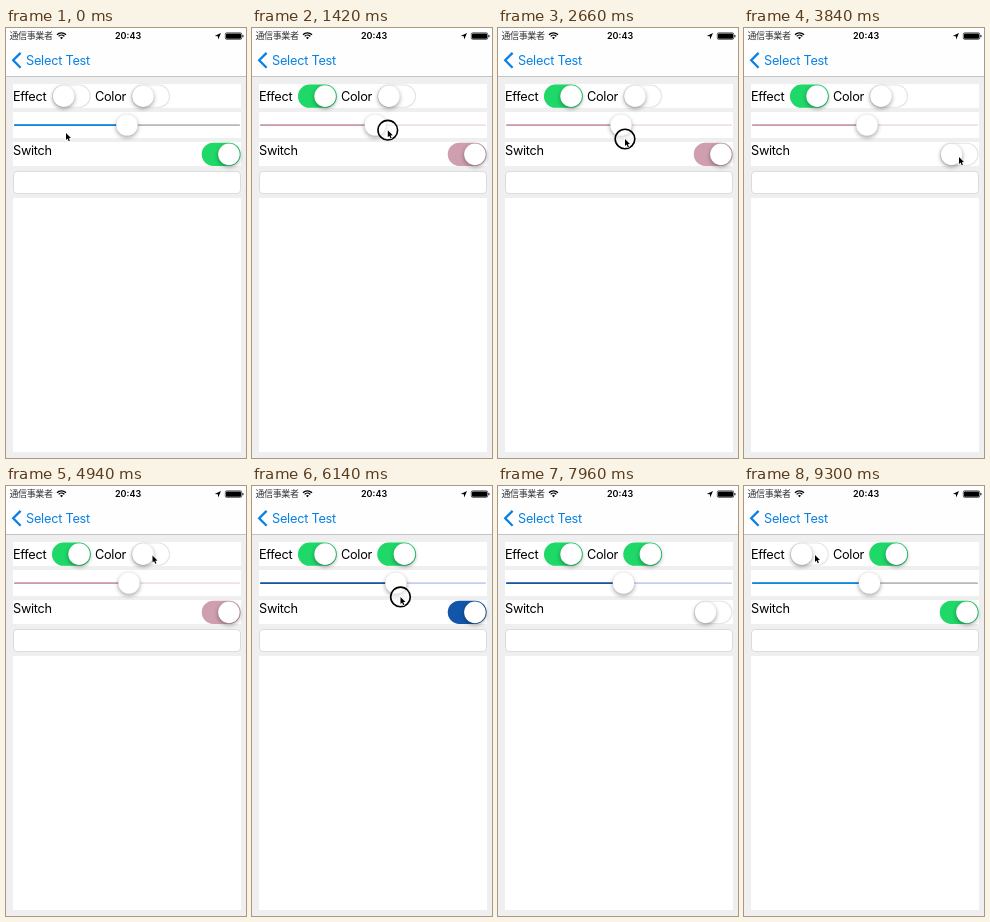
Recreate the animation shown at these times as an HTML page with a canvas. Size 240 by 430 pixels, loop 9320 ms.

```html
<!DOCTYPE html>
<html lang="en">
<head>
<meta charset="utf-8">
<title>Switch and slider</title>
<style>
html, body { margin: 0; width: 100%; height: 100%; overflow: hidden; background: #efeff0; }
#stage { position: absolute; left: 0; top: 0; width: 240px; height: 430px; overflow: hidden;
  font: 12.75px/16px Inter, Roboto, sans-serif; letter-spacing: -0.3px; color: #000; }
#stage > * { position: absolute; box-sizing: border-box; white-space: nowrap; }
.nav { left: 0; top: 0; width: 240px; height: 49px; background: #fefefe; border-bottom: 1px solid #c4c4c4; }
.panel { left: 7px; width: 228px; background: #fff; }
.field { border: 1px solid #dcdcdc; border-radius: 4px; }
.status { top: 2.4px; font-size: 9px; line-height: 12px; letter-spacing: 0; }
canvas { left: 0; top: 0; width: 240px; height: 430px; }
</style>
</head>
<body>
<div id="stage">
  <div class="nav"></div>
  <div class="panel" style="top:56px;height:24px"></div>
  <div class="panel" style="top:84px;height:26px"></div>
  <div class="panel" style="top:114px;height:24px"></div>
  <div class="panel field" style="top:143px;height:23px"></div>
  <div class="panel" style="top:170px;height:254px"></div>
  <span class="status" style="left:3.5px;color:#333;font-family:'Noto Sans CJK JP','Noto Sans CJK',sans-serif;letter-spacing:-0.4px">通信事業者</span>
  <span class="status" style="left:109px;font-weight:600">20:43</span>
  <span style="left:20px;top:25px;color:#0a80e4;letter-spacing:-0.25px">Select Test</span>
  <span style="left:7px;top:60.5px">Effect</span>
  <span style="left:89px;top:60.5px">Color</span>
  <span style="left:7px;top:115px">Switch</span>
  <canvas id="view"></canvas>
</div>
<script>
const LOOP = 9320;
const view = document.getElementById('view');
const ctx = view.getContext('2d');
const dpr = window.devicePixelRatio || 1;
view.width = 240 * dpr;
view.height = 430 * dpr;

const GREEN = 'rgb(30,216,104)';
const THEMES = {
  plain: { min: '#0a88e2', max: '#b8b8b8', on: GREEN },
  pink: { min: '#c99bac', max: '#f0dfe5', on: 'rgb(207,159,175)' },
  blue: { min: '#1458a4', max: '#c6ceec', on: 'rgb(18,86,170)' }
};

const clamp = v => Math.max(0, Math.min(1, v));
const smooth = v => v * v * (3 - 2 * v);
const mix = (a, b, p) => a + (b - a) * p;
const ramp = (t, a, b) => clamp((t - a) / (b - a));

const effect = { x: 46, y: 56.5, tip: [71, 69], on: 0 };
const color = { x: 125.3, y: 56.5, tip: [146.5, 69.5], on: 0 };
const power = { x: 195.8, y: 114.7, tip: [215, 129], on: 1 };

// An action spans start..end; at(t) gives the pointer tip within it.
const rest = (start, end, tip) => ({ start, end, at: () => tip });
const tap = (sw, down) => ({ sw, start: down - 80, down, end: down + 100, at: () => sw.tip });

// The knob swings right, then left, and settles; lead is how far the pointer runs ahead.
function drag(start, end, from, to, swing, lead) {
  const knobAt = t => {
    const p = smooth(ramp(t, start, end));
    return mix(from, to, p) + swing * Math.sin(2 * Math.PI * p);
  };
  const at = t => {
    const p = ramp(t, start, end);
    return [knobAt(t) + mix(lead, 4, smooth(p)), mix(102, 111, smooth(clamp(2 * p)))];
  };
  return { start, down: start, end: end + 80, knobAt, at };
}

const ACTIONS = [
  rest(0, 120, [60, 105]),
  tap(effect, 500),
  drag(1360, 2660, 121, 123, 58, 12.5),
  tap(power, 3300),
  tap(power, 3920),
  tap(color, 5000),
  drag(5680, 6660, 123, 125.5, 72, 5),
  tap(power, 7320),
  rest(7820, 7980, [246, 136]),
  tap(power, 8180),
  tap(effect, 8680)
];
const drags = ACTIONS.filter(a => a.knobAt);
const taps = sw => ACTIONS.filter(a => a.sw === sw);

function pointerAt(t) {
  const i = ACTIONS.findLastIndex(a => a.start <= t);
  const now = ACTIONS[i], next = ACTIONS[i + 1];
  const from = now.at(Math.min(t, now.end));
  if (t <= now.end || !next) return from;
  const to = next.at(next.start), p = smooth(ramp(t, now.end, next.start));
  return from.map((v, k) => mix(v, to[k], p));
}

const sliderAt = t => (drags.findLast(d => d.start <= t) || drags[0]).knobAt(t);
const pressed = t => ACTIONS.some(a => t >= a.down && t < a.end);
const isOn = (sw, t) => (sw.on + taps(sw).filter(a => t >= a.end).length) % 2;

function slide(sw, t) {
  const last = taps(sw).findLast(a => t >= a.end);
  const on = isOn(sw, t);
  return last ? mix(1 - on, on, 1 - (1 - ramp(t, last.end, last.end + 300)) ** 3) : on;
}

const squeeze = (sw, t) => Math.max(...taps(sw).map(a =>
  smooth(ramp(t, a.down, a.end)) * (1 - smooth(ramp(t, a.end, a.end + 200)))));

function pill(x, y, w, h, fill) {
  ctx.beginPath();
  ctx.roundRect(x, y, w, h, h / 2);
  ctx.fillStyle = fill;
  ctx.fill();
}

function knob(x, y, w, h) {
  ctx.save();
  ctx.shadowColor = 'rgba(0,0,0,.36)';
  ctx.shadowBlur = 4 * dpr;
  ctx.shadowOffsetY = 1.8 * dpr;
  pill(x, y, w, h, '#fff');
  ctx.restore();
  ctx.strokeStyle = 'rgba(0,0,0,.07)';
  ctx.lineWidth = 0.5;
  ctx.stroke();
}

function drawSwitch(sw, t, tone) {
  const w = 38.8, h = 23.3, d = 21.6, p = slide(sw, t), wide = 5 * squeeze(sw, t);
  pill(sw.x, sw.y, w, h, '#e5e5e5');
  ctx.globalAlpha = p;
  pill(sw.x, sw.y, w, h, tone);
  ctx.globalAlpha = 1;
  const iw = (w - 2.2) * (1 - p), ih = (h - 2.2) * (1 - p);
  pill(sw.x + (w - iw) / 2, sw.y + (h - ih) / 2, iw, ih, '#fff');
  knob(sw.x + 0.9 + p * (w - d - 1.8 - wide), sw.y + 0.85, d + wide, d);
}

function drawSlider(x, theme) {
  pill(8, 96.3, 226, 1.7, theme.max);
  pill(8, 96.3, x - 8, 1.7, theme.min);
  knob(x - 10.8, 86.2, 21.6, 21.6);
}

function shape(points, x = 0, y = 0) {
  ctx.beginPath();
  points.forEach(([a, b]) => ctx.lineTo(x + a, y + b));
}

function drawBar() {
  ctx.strokeStyle = '#0a80e4';
  ctx.lineWidth = 2.3;
  shape([[14.6, 24.9], [7.2, 32.3], [14.6, 39.7]]);
  ctx.stroke();

  ctx.strokeStyle = ctx.fillStyle = '#000';
  ctx.lineWidth = 1.3;
  for (const r of [3.9, 6.2]) {
    ctx.beginPath();
    ctx.arc(55.5, 11, r, -Math.PI * 0.76, -Math.PI * 0.24);
    ctx.stroke();
  }
  ctx.beginPath();
  ctx.moveTo(55.5, 11.3);
  ctx.arc(55.5, 11, 2, -Math.PI * 0.76, -Math.PI * 0.24);
  ctx.fill();

  shape([[215, 5], [212.2, 11.4], [211.8, 8.3], [208.7, 7.9]]);
  ctx.fill();

  ctx.lineWidth = 0.6;
  ctx.beginPath();
  ctx.roundRect(219.3, 4.8, 16.4, 6.6, 1.4);
  ctx.stroke();
  ctx.beginPath();
  ctx.roundRect(220, 5.5, 15, 5.2, 0.8);
  ctx.fill();
  ctx.fillRect(236.4, 7, 1, 2.2);
}

const ARROW = [[0, 0], [0, 7], [1.6, 5.6], [2.7, 8.2], [3.9, 7.7], [2.8, 5.2], [5, 5.1]];

function drawPointer([x, y], down) {
  if (down) {
    ctx.beginPath();
    ctx.arc(x, y, 9.8, 0, Math.PI * 2);
    ctx.fillStyle = 'rgba(255,255,255,.5)';
    ctx.fill();
    ctx.strokeStyle = '#000';
    ctx.lineWidth = 1.6;
    ctx.stroke();
  }
  shape(ARROW, x, y);
  ctx.closePath();
  ctx.strokeStyle = '#fff';
  ctx.lineWidth = 1.2;
  ctx.stroke();
  ctx.fillStyle = '#000';
  ctx.fill();
}

function draw(t) {
  ctx.setTransform(dpr, 0, 0, dpr, 0, 0);
  ctx.clearRect(0, 0, 240, 430);
  const name = !isOn(effect, t) ? 'plain' : isOn(color, t) ? 'blue' : 'pink';
  const theme = THEMES[name];
  drawBar();
  drawSwitch(effect, t, GREEN);
  drawSwitch(color, t, GREEN);
  drawSlider(sliderAt(t), theme);
  drawSwitch(power, t, theme.on);
  drawPointer(pointerAt(t), pressed(t));
}

const begin = performance.now();
function frame() {
  draw(Math.max(0, performance.now() - begin) % LOOP);
  requestAnimationFrame(frame);
}
draw(0);
requestAnimationFrame(frame);
</script>
</body>
</html>
```
